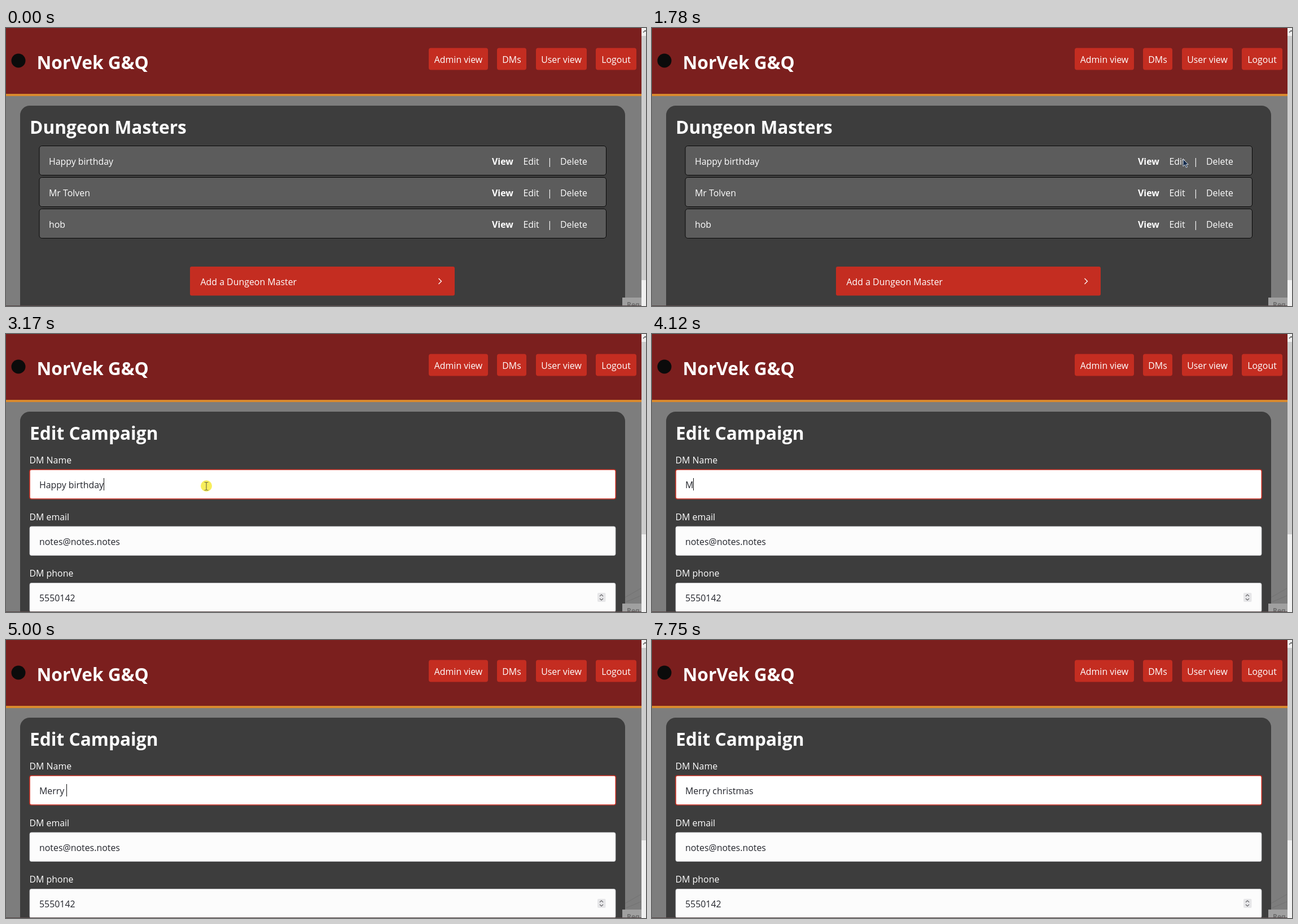
These frames come from a looping animation (1134 px wide and 494 px high, 8000 ms). An HTML page:

```html
<!DOCTYPE html>
<html lang="en">
<head>
<meta charset="utf-8">
<title>Dungeon Masters</title>
<style>
html, body { margin: 0; width: 100%; height: 100%; overflow: hidden; background: #7d7d7d; }
#stage { display: block; }
text { font: 15.9px "Open Sans", "Noto Sans", sans-serif; fill: #fff; white-space: pre; }
.big { font-size: 31.7px; font-weight: 700; }
.bold { font-weight: 700; }
.dark { fill: #23252c; }
.mid { text-anchor: middle; }
</style>
</head>
<body>
<svg id="stage" width="1134" height="494" viewBox="0 0 1134 494"></svg>
<script>
const LOOP = 8000, LOAD = 2320, ICON = 2730, FOCUS = 3170, RELEASE = 3720, TYPE = 4120;
const RED = '#c42d21';
const START = 'Happy birthday';
const TYPED = 'Merry christmas';
const KEYS = [4120, 4330, 4500, 4660, 4800, 5000, 5330, 5530, 5870, 6020, 6420, 6620, 7090, 7090, 7220];
const CARET_OFF = 7750;

// start, end, steps, then start, control and end points of the pointer's path
const MOVES = [
  [130, 890, 12, 1074, 502, 1010, 330, 941, 233],
  [2320, 2520, 4, 941, 233, 765, 202, 590, 262],
  [2730, 2980, 5, 590, 262, 470, 268, 355, 270],
  [3240, 3650, 7, 355, 270, 190, 270, 16, 266]
];

const box = (x, y, w, h, fill, r = 0, extra = '') =>
  `<rect x="${x}" y="${y}" width="${w}" height="${h}" rx="${r}" fill="${fill}" ${extra}/>`;
const label = (x, y, s, cls = '', extra = '') =>
  `<text x="${x}" y="${y}" class="${cls}" ${extra}>${s}</text>`;
const stroke = (d, color, w = 1) =>
  `<path d="${d}" fill="none" stroke="${color}" stroke-width="${w}"/>`;

const navButton = (x, w, s) => box(x, 35.5, w, 39, RED, 4) + label(x + w / 2, 62, s, 'mid');

const row = (y, name) =>
  box(59, y + .5, 1004.5, 52, '#5c5c5c', 4.5, 'stroke="#080808"') +
  label(76, y + 34, name) + label(861, y + 34, 'View', 'bold') +
  label(916.5, y + 34, 'Edit') + label(959, y + 34, '|') + label(982, y + 34, 'Delete');

const field = (y, name, value) =>
  label(41.5, y - 11, name) +
  box(42, y + .5, 1038, 51.5, '#fcfcfc', 3, 'stroke="#c9cbce" stroke-width=".8"') +
  label(59, y + 33, value, 'dark');

const frame =
  box(0, 0, 1126, 494, '#7d7d7d') +
  box(0, 0, 1126, 117, '#7b1f1e') + box(0, 117, 1126, 4, '#d98a2e') +
  label(54.5, 73, 'NorVek G&amp;Q', 'big') +
  navButton(749, 105, 'Admin view') + navButton(870, 52, 'DMs') +
  navButton(939, 90, 'User view') + navButton(1045, 72, 'Logout') +
  box(25, 138, 1072, 400, '#3d3d3d', 17) +
  '<circle id="icon" cx="22" cy="58" r="12.5" fill="#0b0b0b"/>' +
  '<svg id="alt" x="10" y="44" width="25" height="28">' + label(0, 20, 'D20') + '</svg>';

const list = '<g id="list">' +
  label(42, 188, 'Dungeon Masters', 'big') +
  row(209, START) + row(265, 'Mr Tolven') + row(321, 'hob') +
  box(326, 424, 469, 51.5, RED, 3) + label(344.5, 457, 'Add a Dungeon Master') +
  stroke('M766.5 445l5 5-5 5', '#fff', 1.3) + '</g>';

const form = '<g id="form">' +
  label(42, 188, 'Edit Campaign', 'big') +
  field(241, 'DM Name', '') + field(341.5, 'DM email', 'notes@notes.notes') +
  field(442, 'DM phone', '5550142') +
  box(1048, 460, 14.5, 16, '#e6e6e8', 2) +
  stroke('M1052 466l3-3 3 3M1052 470l3 3 3-3', '#66666a', 1.2) +
  stroke('M1097 468l28-16M1099 476l26-11', '#727272') +
  box(42, 241, 1038.3, 52, '#fff', 3, `id="focus" stroke="${RED}" stroke-width="1.6"`) +
  box(0, 255, 0, 23, '#0078d7', 0, 'id="selection"') +
  label(59, 274, '', 'dark', 'id="value"') +
  box(0, 256, 1, 22, '#111', 0, 'id="caret"') + '</g>';

const edges =
  box(1092, 479, 34, 15, '#a0a0a0') + label(1100, 496, 'Req', 'bold', 'style="font-size:12px;fill:#6d6d6d"') +
  box(1126, 0, 8, 494, '#f0f0f0') + box(1126, 14, 8, 434, '#cdcdcd', 0, 'id="thumb"') +
  stroke('M1129 8l3.5-3.5 3.5 3.5', '#555', 1.4) +
  box(0, 493, 1126, 1, '#59494a');

const pointer = '<g id="pointer">' +
  '<circle id="click" r="10" fill="#f8ee5c"/>' +
  '<path id="arrow" d="M0 0V13L3.2 10 5.5 15 7.7 14 5.5 9.4H9.3Z" fill="#172d4d" stroke="#dce4ee" stroke-width=".9"/>' +
  '<path id="hand" d="M-1.5 0Q0-2 1.5 0V5L7 6.5Q8 7 8 9L6.5 16H-2L-6 10Q-5 8-1.5 10Z" fill="#172d4d" stroke="#dce4ee" stroke-width=".9"/>' +
  '<path id="beam" d="M-3.5-6.5H-1L0-5.5 1-6.5H3.5M0-5.5V6.5M-3.5 7.5H-1L0 6.5 1 7.5H3.5" fill="none" stroke="#77713f" stroke-width="1.2"/></g>';

const $ = id => document.getElementById(id);
$('stage').innerHTML = frame + list + form + edges + pointer;

const show = (id, on) => $(id).setAttribute('display', on ? 'inline' : 'none');
const set = (id, name, v) => $(id).setAttribute(name, v);

function pointerAt(t) {
  const [t0, t1, n, ax, ay, bx, by, cx, cy] = MOVES.filter(m => m[0] <= t).pop() || MOVES[0];
  const step = 1 + Math.floor(Math.max(0, t - t0) / (t1 - t0) * (n - 1));
  const k = Math.min(1, step / n), u = k * k * (3 - 2 * k), v = 1 - u;
  return [v * v * ax + 2 * v * u * bx + u * u * cx, v * v * ay + 2 * v * u * by + u * u * cy];
}

function drawPointer(t, x, y) {
  const onForm = t >= LOAD;
  const overText = onForm && y > 241;
  const overLink = !onForm && t < 1780 && x < 946 && y < 248;
  show('pointer', t >= 130 && t < TYPE);
  set('pointer', 'transform', `translate(${x} ${y})`);
  show('beam', overText);
  show('hand', overLink);
  show('arrow', !overText && !overLink);
  show('click', t >= FOCUS && t < RELEASE);
}

function drawValue(t, x) {
  const value = $('value');
  const typing = t >= TYPE;
  const text = typing ? TYPED.slice(0, KEYS.filter(k => k <= t).length) : START;
  value.textContent = text;
  const end = 59 + value.getComputedTextLength();

  // the drag selects from the end of the text back to the pointer
  let from = text.length, left = end;
  if (!typing && t >= FOCUS) {
    while (from > 0 && x < value.getStartPositionOfChar(from - 1).x + 4) from--;
    if (from < text.length) left = value.getStartPositionOfChar(from).x;
  }
  const selected = from < text.length;
  if (selected) value.innerHTML = text.slice(0, from) + `<tspan fill="#fff">${text.slice(from)}</tspan>`;
  set('selection', 'x', left);
  set('selection', 'width', end - left);
  set('caret', 'x', Math.round(end));
  show('caret', t >= FOCUS && t < CARET_OFF && !selected);
}

function draw() {
  const t = performance.now() % LOOP;
  const onForm = t >= LOAD;
  const [x, y] = pointerAt(t);
  show('list', !onForm);
  show('form', onForm);
  const loading = onForm && t < ICON;
  show('icon', !loading);
  show('alt', loading);
  show('focus', t >= FOCUS);
  set('thumb', 'height', onForm ? 342 : 434);
  if (onForm) drawValue(t, x);
  drawPointer(t, x, y);
  requestAnimationFrame(draw);
}
draw();
</script>
</body>
</html>
```
